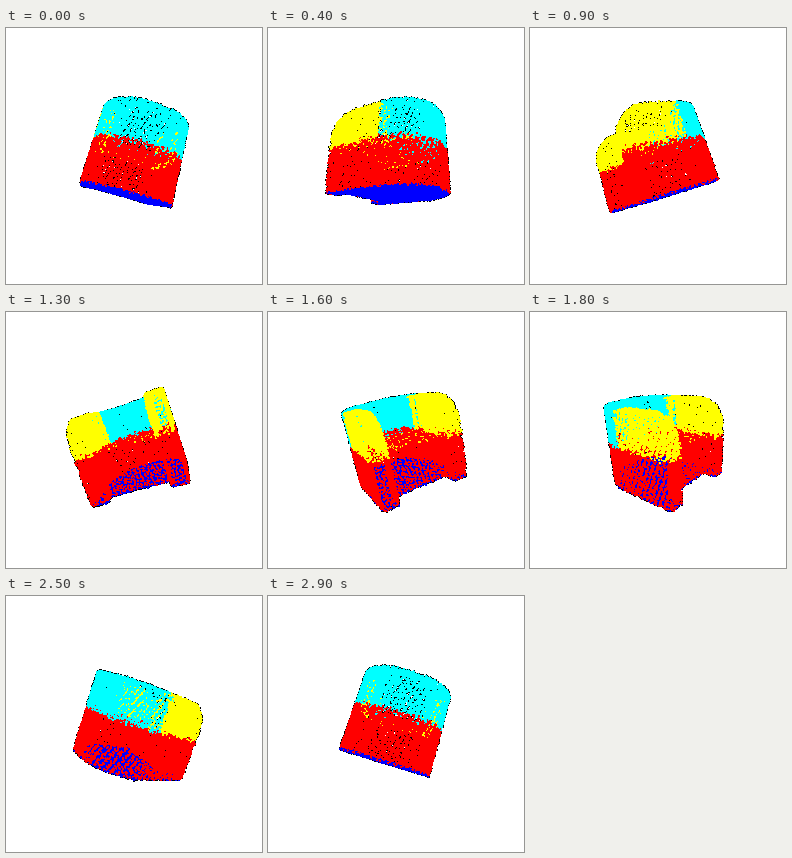
Animation, 256 px wide and 256 px high, one loop 3 s. Source, as a matplotlib script:

```python
import numpy as np
import matplotlib.pyplot as plt
from matplotlib.animation import FuncAnimation

SIZE, FRAMES = 256, 30
FOCAL = 222              # 60 degree field of view, camera distance in pixels
RADIUS = 1.5             # splat radius in pixels
TILT = np.radians(19.5)
HALF_W, HALF_D, HEIGHT = 42, 45, 76
THICK, ROUND, CORNER, BULGE = 14, 24, 33, 6
SEAT, FRONT = 0.53 * HEIGHT, 31
CYAN, YELLOW, RED, BLUE = range(4)
COLORS = np.array([(0, 255, 255), (255, 255, 0), (255, 0, 0), (0, 0, 255)], np.uint8)

rng = np.random.default_rng(4)


def spread(n):
    """Evenly scattered pairs in the unit square (R2 sequence)."""
    i = np.arange(1, n + 1)
    return i * 0.7548776662 % 1, i * 0.5698402910 % 1


def bulge(a):
    return BULGE * (1 - (a / HALF_W) ** 2)


def plan(t, inset):
    """Points on the U-shaped floor plan at t in 0..1, moved inwards by inset."""
    t = 2 * t - 1
    r = CORNER - inset
    half = HALF_W - CORNER
    arm = 2 * HALF_D - CORNER
    arc = r * np.pi / 2
    s = np.abs(t) * (half + arc + arm)
    turn = np.clip((s - half) / r, 0, np.pi / 2)
    a = np.minimum(s, half) + r * np.sin(turn)
    b = CORNER - HALF_D - r * np.cos(turn) + np.maximum(s - half - arc, 0)
    return a * np.sign(t), np.where(b < 0, b - bulge(a), b)


def top(b):
    """Height of the armrest, rounded off at the front."""
    x = np.clip(b - (HALF_D - ROUND), 0, ROUND)
    return HEIGHT - ROUND + np.sqrt(ROUND**2 - x**2)


def front_edge(h):
    y = np.clip(h - (HEIGHT - ROUND), 0, ROUND)
    return HALF_D - ROUND + np.sqrt(ROUND**2 - y**2)


def wall(n, inset):
    t, v = spread(n)
    a, b = plan(t, inset)
    h = v * HEIGHT
    keep = h <= top(b)
    if inset:
        keep &= (h > SEAT) | (b > FRONT)
    return a[keep], b[keep], h[keep]


def rim(n):
    t, v = spread(n)
    a, b = plan(t, v * THICK)
    return a, b, top(b)


def arm_fronts(n):
    u, v = spread(n)
    a = (2 * u - 1) * THICK
    a += np.sign(a) * (HALF_W - THICK)
    return a, front_edge(v * HEIGHT), v * HEIGHT


def seat(n):
    u, v = spread(n)
    back = THICK - HALF_D
    return (2 * u - 1) * (HALF_W - THICK), back + v * (FRONT - back), np.full(n, SEAT)


def seat_front(n):
    u, v = spread(n)
    return (2 * u - 1) * (HALF_W - THICK), np.full(n, FRONT), v * SEAT


def underside(n):
    u, v = spread(n)
    a = (2 * u - 1) * HALF_W
    b = v * (2 * HALF_D + BULGE) - HALF_D - BULGE
    dx = np.maximum(np.abs(a) - (HALF_W - CORNER), 0)
    dy = np.maximum(CORNER - HALF_D - b - bulge(a), 0)
    notch = (np.abs(a) < HALF_W - THICK) & (b > FRONT)
    keep = (np.hypot(dx, dy) < CORNER) & ~notch
    return a[keep], b[keep], np.zeros(keep.sum())


def build():
    parts = [wall(4800, 0), wall(3900, THICK), rim(750), arm_fronts(600),
             seat(970), seat_front(450), underside(2900)]
    a, b, h = np.hstack([np.array(p) for p in parts])
    n, base = len(a), len(parts[-1][0])
    label = np.where(b + rng.normal(0, 1.2, n) < -12, CYAN, YELLOW)
    label[h + rng.normal(0, 1.5, n) < SEAT + 1.5] = RED
    label[n - base:] = BLUE
    a, b, h = np.array([a, b, h]) + rng.normal(0, 0.4, (3, n))

    # Lean the chair; its front lies 60 degrees from the leaning direction.
    b, h = b + 3, h - HEIGHT / 2
    c, s = np.cos(np.pi / 3), np.sin(np.pi / 3)
    p, q = b * c + a * s, b * s - a * c
    lean_p = p * np.cos(TILT) + h * np.sin(TILT)
    lean_h = h * np.cos(TILT) - p * np.sin(TILT)
    return lean_p, q, lean_h, label


P, Q, H, LABEL = build()


def project(angle):
    c, s = np.cos(angle), np.sin(angle)
    x, z = P * c - Q * s, P * s + Q * c + FOCAL
    return SIZE / 2 + FOCAL * x / z, SIZE / 2 + 1 - FOCAL * H / z, z


def render(i):
    """Blend soft round splats from front to back; thin coverage stays black."""
    x, y, z = project(np.radians(42 + 360 * i / FRAMES))
    dx, dy = (g.reshape(-1, 1) for g in np.mgrid[-1:2, -1:2])
    px, py = np.floor(x).astype(int) + dx, np.floor(y).astype(int) + dy
    w = 1 - ((px + 0.5 - x) ** 2 + (py + 0.5 - y) ** 2) / RADIUS**2
    hit = w > 0
    pix = (py * SIZE + px)[hit]
    depth = np.broadcast_to(z, w.shape)[hit]
    label = np.broadcast_to(LABEL, w.shape)[hit]
    w = np.minimum(w[hit], 0.99)

    order = np.lexsort((depth, pix))
    pix, label, w = pix[order], label[order], w[order]
    log_t = np.log(1 - w)
    before = np.cumsum(log_t) - log_t
    _, first, group = np.unique(pix, return_index=True, return_inverse=True)
    share = w * np.exp(before - before[first][group])

    total = np.array([np.bincount(pix[label == k], share[label == k], SIZE * SIZE)
                      for k in range(4)])
    img = COLORS[total.argmax(0)]
    cover = total.sum(0)
    img[cover < 0.5] = 0
    img[cover == 0] = 255
    return img.reshape(SIZE, SIZE, 3)


fig = plt.figure(figsize=(4, 4), dpi=64, facecolor="white")
ax = fig.add_axes([0, 0, 1, 1])
ax.axis("off")
picture = ax.imshow(render(0), interpolation="nearest", aspect="auto")


def update(i):
    picture.set_data(render(i))
    return [picture]


anim = FuncAnimation(fig, update, frames=FRAMES, interval=100, repeat=True)
plt.show()
```
